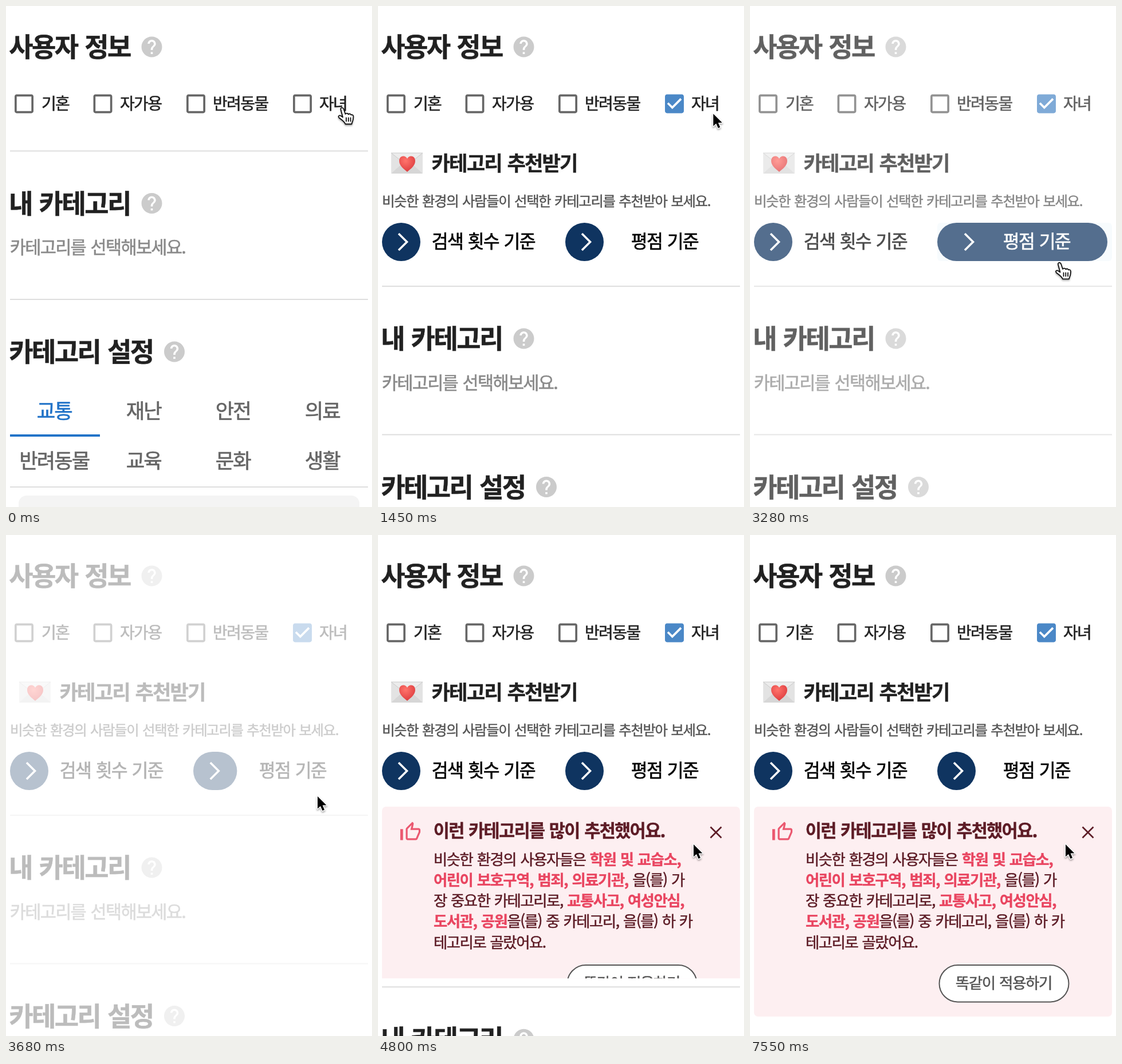
An HTML page that plays this animation: 639 px wide and 876 px high, repeating every 7680 ms.

```html
<!DOCTYPE html>
<html lang="ko">
<head>
<meta charset="utf-8">
<title>카테고리 설정</title>
<style>
  html, body { margin: 0; width: 100%; height: 100%; overflow: hidden; background: #fff; }
  svg { display: block; width: 100%; height: 100%; }
  text {
    font-family: "Noto Sans CJK KR", "Noto Sans KR", "Noto Sans CJK", sans-serif;
    letter-spacing: -.055em; word-spacing: .05em;
  }
  .m { font-weight: 500; stroke-width: .02em; }
  .b { font-weight: 700; stroke-width: .012em; }
  .hot { font-weight: 700; fill: #e94560; stroke: #e94560; stroke-width: .012em; }
  #cursor { filter: drop-shadow(0 2px 1.5px rgba(0,0,0,.35)); }
</style>
</head>
<body>
<svg id="view" viewBox="0 0 639 876" xmlns="http://www.w3.org/2000/svg"></svg>
<script>
const LOOP = 7680;
const INTRO_H = 236.5, PANEL_H = 396;
const NAVY = '#0f3460', WINE = '#5d1c26', INK = '#212121';

// Markup helpers; text is placed by its vertical centre.
const text = (x, cy, size, str, fill = INK, cls = 'm', extra = '') =>
  `<text x="${x - size * .04}" y="${cy + size * .37}" font-size="${size}" fill="${fill}" stroke="${fill}" class="${cls}" ${extra}>${str}</text>`;
const centered = (x, cy, size, str, fill) =>
  text(x + size * .02, cy, size, str, fill, 'm', 'text-anchor="middle"');
const line = y => `<rect x="7" y="${y - 1}" width="625" height="2" fill="#dedede"/>`;
const icon = (cx, cy, scale, fill, d) =>
  `<path transform="translate(${cx} ${cy}) scale(${scale}) translate(-12 -12)" fill="${fill}" d="${d}"/>`;

const HELP = 'M12 2C6.48 2 2 6.48 2 12s4.48 10 10 10 10-4.48 10-10S17.52 2 12 2zm1 17h-2v-2h2v2zm2.07-7.75l-.9.92C13.45 12.9 13 13.5 13 15h-2v-.5c0-1.1.45-2.1 1.17-2.83l1.24-1.26c.37-.36.59-.86.59-1.41 0-1.1-.9-2-2-2s-2 .9-2 2H8c0-2.21 1.79-4 4-4s4 1.79 4 4c0 .88-.36 1.68-.93 2.25z';
const BOX = 'M19 5v14H5V5h14m0-2H5c-1.1 0-2 .9-2 2v14c0 1.1.9 2 2 2h14c1.1 0 2-.9 2-2V5c0-1.1-.9-2-2-2z';
const CHECKED = 'M19 3H5c-1.11 0-2 .9-2 2v14c0 1.1.89 2 2 2h14c1.11 0 2-.9 2-2V5c0-1.1-.89-2-2-2zm-9 14l-5-5 1.41-1.41L10 14.17l7.59-7.59L19 8l-9 9z';
const THUMB = 'M9 21h9c.83 0 1.54-.5 1.84-1.22l3.02-7.05c.09-.23.14-.47.14-.73v-2c0-1.1-.9-2-2-2h-6.31l.95-4.57.03-.32c0-.41-.17-.79-.44-1.06L14.17 1 7.58 7.59C7.22 7.95 7 8.45 7 9v10c0 1.1.9 2 2 2zM9 9l4.34-4.34L12 10h9v2l-3 7H9V9zM1 9h3v12H1z';

const heading = (cy, str, helpX) =>
  text(7, cy, 46, str, INK, 'b') + icon(helpX, cy + .5, 1.8, '#cbcbcb', HELP);

const checkbox = (cx, labelX, label, id = '') =>
  `<g id="${id}">${icon(cx, 171, 1.83, '#666', BOX)}</g>` + text(labelX, 170.5, 28, label);

const envelope = `
  <g transform="translate(23 257)">
    <rect width="55" height="36" rx="1.5" fill="#e3e3e3"/>
    <path d="M0 36L22 16H33L55 36Z" fill="#d6d6d6"/>
    <path d="M0 0H55L29.5 20Q27.5 21.5 25.5 20Z" fill="#ececec" stroke="#cacaca"/>
    <path d="M28 33C22 28 14 22 14 14C14 4 25 3 28 10C31 3 42 4 42 14C42 22 34 28 28 33Z" fill="url(#heart)"/>
  </g>`;

const pill = (x, label, labelX, id) => `
  <rect id="${id}Pill" x="${x}" y="379" width="67" height="67" rx="33.5" fill="${NAVY}"/>
  <path id="${id}Arrow" d="M${x + 29} 398l14.5 14.5l-14.5 14.5" fill="none" stroke="#fff" stroke-width="3.6"/>
  <g id="${id}Label" color="#000">${text(labelX, 411, 31.4, label, 'currentColor')}</g>`;

const hot = str => `<tspan class="hot">${str}</tspan>`;
const advice = [
  '비슷한 환경의 사용자들은 ' + hot('학원 및 교습소,'),
  hot('어린이 보호구역, 범죄, 의료기관,') + ' 을(를) 가',
  '장 중요한 카테고리로, ' + hot('교통사고, 여성안심,'),
  hot('도서관, 공원') + '을(를) 중 카테고리, 을(를) 하 카',
  '테고리로 골랐어요.'
];

const panel = `
  <rect x="7" y="475" width="625" height="367" rx="7" fill="#fdeff1"/>
  ${icon(56.5, 519, 1.6, '#eb5870', THUMB)}
  ${text(98, 517, 30.6, '이런 카테고리를 많이 추천했어요.', WINE, 'b')}
  <path d="M580.5 510.5l19 19m0-19l-19 19" stroke="${WINE}" stroke-width="2.6"/>
  ${advice.map((row, i) => text(98, 567 + i * 36.2, 26.4, row, WINE)).join('')}
  <rect x="330.5" y="752" width="226" height="64.5" rx="32.2" fill="#fff" stroke="#555" stroke-width="2"/>
  ${centered(443.5, 783, 26.6, '똑같이 적용하기', '#555')}`;

const tabs = ['교통', '재난', '안전', '의료', '반려동물', '교육', '문화', '생활'].map((name, i) =>
  centered(85 + (i % 4) * 156, i < 4 ? 707.5 : 794.5, 35.3, name, i ? '#666' : '#2273c8')).join('');

document.getElementById('view').innerHTML = `
  <defs>
    <clipPath id="fold"><rect id="foldRect" x="0" y="238.5" width="639" height="0"/></clipPath>
    <radialGradient id="heart" cx=".4" cy=".3" r=".75">
      <stop offset="0" stop-color="#ff746c"/><stop offset="1" stop-color="#dc3a3d"/>
    </radialGradient>
  </defs>
  <g id="page">
    ${heading(71, '사용자 정보', 254.5)}
    ${checkbox(31.5, 63, '기혼')}
    ${checkbox(169, 200, '자가용')}
    ${checkbox(331.5, 362, '반려동물')}
    ${checkbox(517.5, 548, '자녀', 'empty')}
    <g id="ticked">${icon(517.5, 171, 1.83, '#4b88c7', CHECKED)}</g>
    <g clip-path="url(#fold)">
      ${envelope}
      ${text(95, 275, 35.3, '카테고리 추천받기', INK, 'b')}
      ${text(8, 341, 24.4, '비슷한 환경의 사람들이 선택한 카테고리를 추천받아 보세요.', '#555')}
      ${pill(7, '검색 횟수 기준', 95, 'count')}
      <rect id="tint" x="327" y="379" width="305" height="67" rx="6" fill="#f4f9fd"/>
      ${pill(327, '평점 기준', 443, 'rate')}
      ${panel}
    </g>
    <g id="below">
      ${line(253.5)}
      ${heading(344.5, '내 카테고리', 254.5)}
      ${text(8, 422, 30.6, '카테고리를 선택해보세요.', '#8a8a8a')}
      ${line(513)}
      ${heading(604, '카테고리 설정', 294)}
      ${tabs}
      <rect x="7" y="749" width="157" height="4" fill="#2273c8"/>
      ${line(841)}
      <rect x="22" y="856" width="595" height="200" rx="14" fill="#f4f4f4"/>
    </g>
  </g>
  <g id="cursor">
    <g id="hand" stroke="#111" stroke-width="1.8" stroke-linejoin="round" stroke-linecap="round">
      <path fill="#fff" d="M-2.5 3C-3.5-.5 1-1.5 2.5 2L5.5 11C7 9 10 9.5 11 11.5C12.5 9.8 15 10.5 15.5 12.5C18 11.5 19.5 13 19.5 15.5L19 20C18.5 24 17 25 16.5 28.5H5.5C4 24-1 21-5.5 17.5C-8 14.5-5 12.5-2.5 14L1 16.5Z"/>
      <path d="M7 17.5v6M10.8 17.5v6M14.6 17.5v6"/>
    </g>
    <path id="arrow" fill="#000" stroke="#fff" stroke-width="3" paint-order="stroke" stroke-linejoin="round"
      d="M0 1V22.5L5 18L8.5 26L12 24.5L8.6 16.5H15.5Z"/>
  </g>`;

const $ = id => document.getElementById(id);
const set = (id, attr, value) => $(id).setAttribute(attr, value);
const show = (id, on) => set(id, 'visibility', on ? 'visible' : 'hidden');
const clamp = p => Math.min(1, Math.max(0, p));
const mix = (a, b, p) => a + (b - a) * p;

// CSS-style cubic bezier with control points (x1, 0) and (x2, 1).
function bezier(x1, x2) {
  return p => {
    if (p <= 0 || p >= 1) return clamp(p);
    let lo = 0, hi = 1, s;
    for (let i = 0; i < 24; i++) {
      s = (lo + hi) / 2;
      const x = 3 * (1 - s) * (1 - s) * s * x1 + 3 * (1 - s) * s * s * x2 + s * s * s;
      if (x < p) lo = s; else hi = s;
    }
    return s * s * (3 - 2 * s);
  };
}
const standard = bezier(.4, .2);
const swift = bezier(.65, .076);
const span = (t, start, length, ease = standard) => ease(clamp((t - start) / length));

// Cursor moves: start time, duration, destination.
const moves = [
  [1380, 620, 540, 448],
  [3260, 110, 544, 456],
  [3720, 360, 551, 540]
];

function cursorAt(t) {
  let x = 587, y = 178;
  for (const [start, length, tx, ty] of moves) {
    const p = span(t, start, length);
    x = mix(x, tx, p);
    y = mix(y, ty, p);
  }
  return [x, y];
}

function draw(t) {
  const fold = INTRO_H * span(t, 896, 300) + PANEL_H * span(t, 4655, 300);
  set('foldRect', 'height', fold);
  set('below', 'transform', `translate(0 ${fold})`);

  show('empty', t < 700);
  show('ticked', t >= 700);

  const hover = span(t, 1670, 450, swift) - span(t, 3355, 450, swift);
  const shade = Math.round(255 * hover);
  set('ratePill', 'width', mix(67, 297, hover));
  set('rateArrow', 'transform', `translate(${19 * hover} 0)`);
  set('rateLabel', 'color', `rgb(${shade},${shade},${shade})`);
  set('tint', 'opacity', span(t, 1670, 250) - span(t, 3355, 250));

  set('page', 'opacity', t < 4630 ? mix(1, .3, span(t, 3210, 225)) : 1);

  const [x, y] = cursorAt(t);
  const pointing = t < 1430 || (t >= 1670 && t < 3340);
  set('cursor', 'transform', `translate(${x} ${y})`);
  show('hand', pointing);
  show('arrow', !pointing);
}

const begin = performance.now();
function tick() {
  draw((performance.now() - begin) % LOOP);
  requestAnimationFrame(tick);
}
tick();
</script>
</body>
</html>
```
